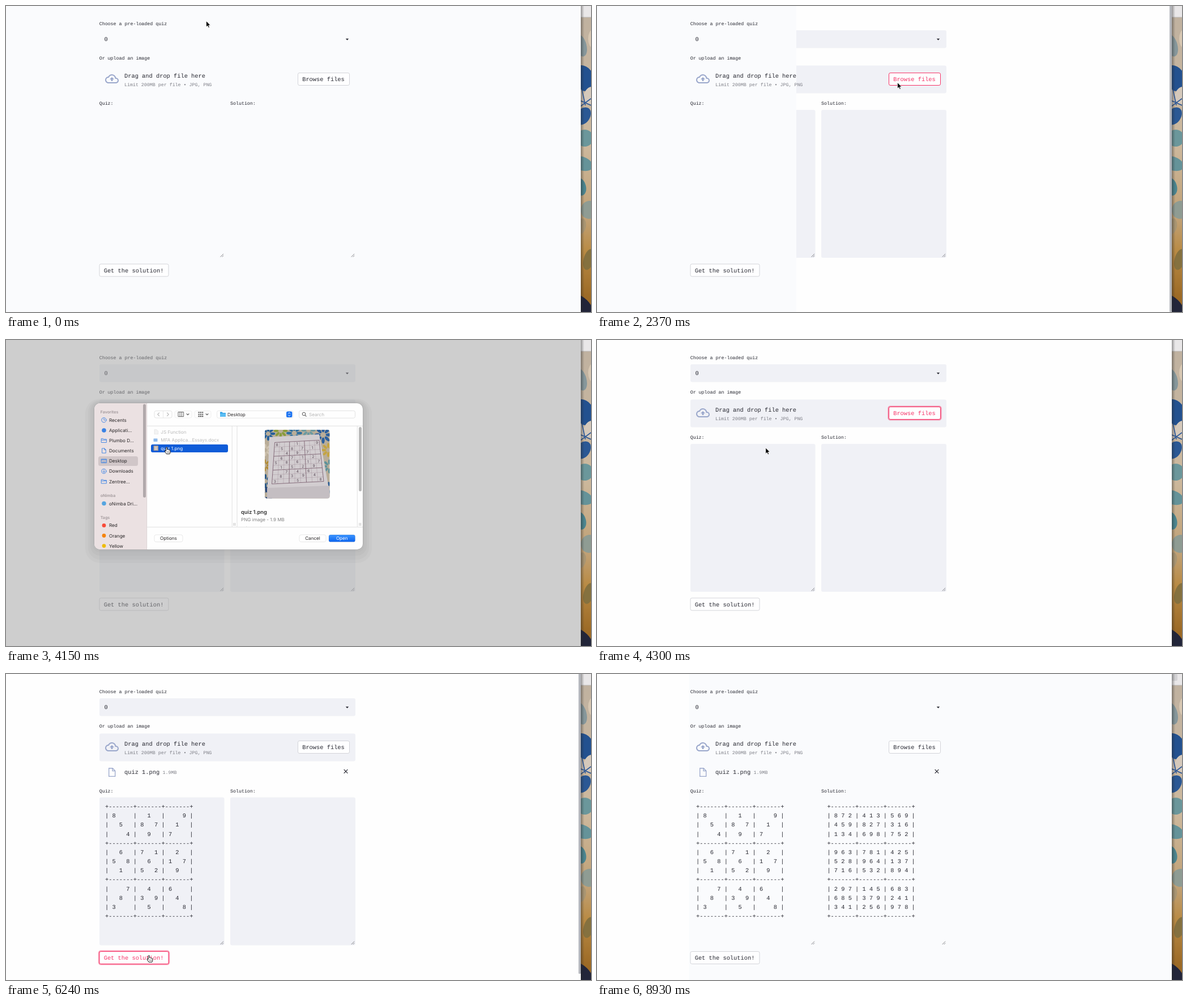
An HTML page for the animation above (9030 ms loop, 1033 by 542 pixels).

```html
<!DOCTYPE html>
<html lang="en">
<head>
<meta charset="utf-8">
<title>Quiz solver</title>
<style>
html, body { margin: 0; width: 100%; height: 100%; overflow: hidden; background: #fefefe; }
svg { display: block; width: 100vw; height: 100vh; }
text { white-space: pre; text-rendering: geometricPrecision; fill: #262730; }
.mono { font-family: "Liberation Mono", "Noto Sans Mono", monospace; }
.ui { font-family: Inter, Roboto, sans-serif; }
.box { fill: #fefeff; stroke: #d3d4d9; }
.ring { fill: none; stroke: #f63366; stroke-opacity: .5; stroke-width: 2.2; visibility: hidden; }
.hot .box { stroke: #f63366; }
.hot text { fill: #f63366; }
.focus .ring { visibility: visible; }
.icon { fill: none; stroke: #3a82e4; stroke-width: .9; stroke-linejoin: round; stroke-linecap: round; }
</style>
</head>
<body>
<script>
const LOOP = 9030;
const PANEL = "#f0f1f6", TINT = "#fafbfd";

// ---------- markup helpers ----------
const text = (cls, x, y, str, size, more = "") =>
  `<text class="${cls}" x="${x}" y="${y}" font-size="${size}" ${more}>${str}</text>`;
const mono = (x, y, str, size = 10.37, more) => text("mono", x, y, str, size, more);
const label = (x, y, str) => mono(x, y, str, 8.3);
const ui = (x, y, str, fill = "#2a2728", size = 8.15, more = "") =>
  text("ui", x, y, str, size, `style="fill:${fill}" ${more}`);
const rect = (x, y, w, h, r, fill, more = "") =>
  `<rect x="${x}" y="${y}" width="${w}" height="${h}" rx="${r}" fill="${fill}" ${more}/>`;
const path = (d, more = "") => `<path d="${d}" ${more}/>`;
const line = (d, color, w = 1) => path(d, `fill="none" stroke="${color}" stroke-width="${w}"`);
const dot = (x, y, r, fill) => `<circle cx="${x}" cy="${y}" r="${r}" fill="${fill}"/>`;
const oval = (x, y, rx, ry, fill, turn = 0) =>
  `<ellipse cx="${x}" cy="${y}" rx="${rx}" ry="${ry}" fill="${fill}" transform="rotate(${turn} ${x} ${y})"/>`;
const group = (id, body, more = "") => `<g id="${id}" ${more}>${body}</g>`;

const button = (id, x, y, w, str) => group(id,
  `<rect class="ring" x="${x - 1}" y="${y - 1}" width="${w + 2}" height="24" rx="3.5"/>` +
  `<rect class="box" x="${x}" y="${y}" width="${w}" height="22" rx="2.6"/>` +
  mono(x + 7.7, y + 14.6, str));

// ---------- quiz grids ----------
const QUIZ = "800010009050807010004090700060701020508060107010502090007040600080309040300050008";
const ANSWER = "872413569459827316134698752963781425528964137716532894297145683685379241341256978";

function gridLines(digits) {
  const rule = "+-------+-------+-------+", out = [];
  for (let r = 0; r < 9; r++) {
    if (r % 3 === 0) out.push(rule);
    const row = digits.slice(r * 9, r * 9 + 9).replace(/0/g, " ");
    out.push("| " + row.match(/.../g).map(s => [...s].join(" ")).join(" | ") + " |");
  }
  return [...out, rule];
}
const gridText = (id, x, digits) => group(id,
  gridLines(digits).map((s, i) => mono(x, (238 + i * 16.18).toFixed(2), s)).join(""));

// ---------- page ----------
const handle = x => line(`M${x - 6} 444.5l5.5-5.5M${x - 3} 444.5l2.5-2.5`, "#77787d", .9);
const cloud = "M19.35 10.04A7.49 7.49 0 0 0 12 4C9.11 4 6.6 5.64 5.35 8.04A6 6 0 0 0 0 14c0 3.31 2.69 6 6 6h13c2.76 0 5-2.24 5-5 0-2.64-2.05-4.78-4.65-4.96z" +
  "M19 18H6c-2.21 0-4-1.79-4-4 0-2.05 1.53-3.76 3.56-3.97l1.07-.11.5-.95A5.47 5.47 0 0 1 12 6c2.62 0 4.88 1.86 5.39 4.43l.3 1.5 1.53.11A2.98 2.98 0 0 1 22 15c0 1.65-1.35 3-3 3z" +
  "M8 13h2.55v3h2.9v-3H16l-4-4z";

const page =
  rect(0, 0, 1015, 542, 0, "#fefefe") +
  rect(165, 43, 452, 31.5, 3, PANEL) + rect(165, 105.5, 452, 49, 3, PANEL) +
  group("areas", rect(165, 184, 220.5, 262, 3, PANEL) + rect(396, 184, 221, 262, 3, PANEL)) +
  `<rect id="tint" height="542" fill="${TINT}"/>` +
  label(164.7, 33.7, "Choose a pre-loaded quiz") + mono(173.6, 62.4, "0") +
  path("M599.8 57.8h5.4l-2.7 3z", `fill="#262730"`) +
  label(164.7, 95.4, "Or upload an image") +
  path(cloud, `transform="translate(175 117)" fill="#9aa7cb"`) +
  mono(209, 127.3, "Drag and drop file here") +
  mono(209, 142.2, "Limit 200MB per file • JPG, PNG", 8.3, `style="fill:#7d7e86"`) +
  button("browse", 515.5, 118.5, 91, "Browse files") +
  group("file",
    line("M181.7 167h6.6l4.4 4.4v10h-11zM188 167.3v4.4h4.4", "#9aa7cb", 1.3) +
    mono(209, 176.6, "quiz 1.png") +
    mono(276.5, 176.5, "1.9MB", 8.3, `style="fill:#7d7e86"`) +
    line("M596.7 169.2l6.6 6.6m0-6.6l-6.6 6.6", "#262730", 1.2)) +
  group("lower",
    label(164.7, 175, "Quiz:") + label(396, 175, "Solution:") +
    handle(384.5) + handle(615.7) +
    button("solve", 165, 457, 122, "Get the solution!")) +
  gridText("quiz", 175, QUIZ) + gridText("answer", 406.4, ANSWER) +
  group("bar", rect(1011, -4, 4, 546, 1.5, "#b5b7bd"));

// ---------- patterned strip beside the window ----------
const strip = `<g clip-path="url(#stripClip)">` +
  rect(1015, 0, 18, 542, 0, "url(#cloth)") +
  oval(1015, 70, 10, 20, "#86979b", -15) + oval(1036, 58, 8, 16, "#d8c8b3") +
  oval(1020, 128, 18, 24, "#23518f", -25) + oval(1034, 158, 13, 16, "#d5c9bb", 25) +
  oval(1013, 160, 9, 15, "#cfc4b8", -20) + oval(1019, 195, 12, 17, "#2b5894", 35) +
  line("M1014 178l19-14M1017 148l6 28M1015 168l18 8", "#2a5799", 1.6) +
  oval(1022, 234, 15, 15, "#6b979b", 30) + oval(1017, 279, 20, 12, "#659399", 20) +
  oval(1014, 320, 10, 16, "#4c858f", -15) + oval(1030, 361, 15, 16, "#8f9c93", 20) +
  oval(1016, 390, 8, 14, "#a99572", 10) + oval(1029, 449, 9, 19, "#85713f", 15) +
  path("M1015 513Q1027 520 1033 530V542H1015Z", `fill="#22253a"`) +
  rect(1015, 0, 18, 20, 0, "#e9e7e8") + rect(1015, 19.5, 18, 1, 0, "#bcb8b6") +
  group("chip", rect(1015, 0, 10, 12, 2, "#d3d2d4")) +
  rect(1015, 0, 6, 542, 0, "url(#edge)") + `</g>`;

// ---------- preview photo ----------
function flower(x, y, r, color) {
  let s = "";
  for (let a = 0; a < 360; a += 45) {
    const k = a * Math.PI / 180;
    s += oval((x + Math.cos(k) * r).toFixed(1), (y + Math.sin(k) * r).toFixed(1), r * .55, r * .27, color, a);
  }
  return s;
}
// Bilinear mapping of the unit square onto the tilted sheet.
function onSheet(u, v) {
  const mix = (a, b, k) => a + (b - a) * k;
  return [mix(mix(474.5, 553, u), mix(469.5, 561, u), v), mix(mix(181.5, 177.5, u), mix(255, 250.5, u), v)]
    .map(n => n.toFixed(1));
}
function sheet() {
  let s = path("M465 172L553 167 572 274 461 281Z", `fill="#d2cdd0"`) +
          path("M461 262L570 258 572 274V281H461Z", `fill="#c4bec2"`);
  for (let i = 0; i <= 9; i++) {
    const k = i / 9, w = i % 3 ? .25 : .9;
    s += line(`M${onSheet(k, 0)}L${onSheet(k, 1)}M${onSheet(0, k)}L${onSheet(1, k)}`, "#7d6272", w);
  }
  [...QUIZ].forEach((d, i) => {
    if (d === "0") return;
    const [x, y] = onSheet((i % 9 + .5) / 9, (Math.floor(i / 9) + .5) / 9);
    s += ui(x, +y + 2.3, d, "#5b4b58", 6.6, `text-anchor="middle"`);
  });
  return s;
}
const photo = `<g clip-path="url(#photoClip)">` + rect(457, 159, 115, 122, 0, "#b9ad98") +
  [[463, 166, 8, "#27609a"], [485, 161, 8, "#8a9c3c"], [509, 165, 9, "#2f6f9f"], [534, 160, 8, "#6d9aa0"],
   [560, 168, 10, "#2c5f9d"], [569, 195, 8, "#c5a442"], [571, 224, 8, "#5f929a"], [458, 195, 7, "#cfc3b0"],
   [457, 222, 7, "#b28b33"], [458, 250, 8, "#2e5b88"], [460, 274, 9, "#29497c"], [570, 262, 7, "#2a5c93"]]
    .map(f => flower(...f)).join("") + sheet() + `</g>`;

// ---------- file dialog ----------
const folder = (x, y) => `M${x} ${y - 3.3}h3l1 1.2h4.8v5.6h-8.8zM${x} ${y - .8}h8.8`;
const glyph = d => path(d, `class="icon"`);
const ring = y => `<circle class="icon" cx="173" cy="${y}" r="4.1"/>`;
const pill = (x, w, str, fill, ink, id = "") =>
  `<g id="${id}">` + rect(x, 345, w, 12.6, 3.2, fill, `stroke="#000" stroke-opacity=".13" stroke-width=".7"`) +
  ui(x + w / 2, 354.2, str, ink, 8.15, `text-anchor="middle"`) + `</g>`;
const head = (y, str) => ui(166.7, y, str, "#a0979a", 7.1, `font-weight="600"`);
const item = (y, str) => ui(182, y, str);
const chevron = x => line(`M${x - 2.3} 130.4l2.3 2.3 2.3-2.3`, "#555", 1.1);
const grip = x => line(`M${x - 1} 324v5M${x + 1.5} 324v5`, "#b3b3b3", .8);

const sidebar = rect(156, 112, 92.5, 259, 0, "#ebe1e2") + rect(248.3, 112, .8, 259, 0, "#d6cccd") +
  rect(163, 206, 70, 17, 3.5, "#d0c6c8") + rect(242, 113.5, 5, 165.5, 2.5, "#b1a9ab") +
  head(129.8, "Favorites") + head(277.5, "oNimba") + head(316.6, "Tags") +
  ["Recents", "Applicati...", "Plumbo D...", "Documents", "Desktop", "Downloads", "Zentree..."]
    .map((s, i) => item((144.8 + i * 18.12).toFixed(1), s)).join("") +
  item(292.6, "oNimba Dri...") +
  ring(141.8) + glyph("M173 139.2v2.8h2") + dot(173, 160, 3.8, "#3a82e4") +
  glyph(folder(168.6, 178)) + glyph("M170 192h4l2.3 2.3v5.9h-6.3zM173.8 192v2.5h2.4") +
  glyph("M168.6 211h8.8v6.6h-8.8zM168.6 212.3h8.8M170 216h6") +
  ring(232.4) + glyph("M173 230v4.6m-1.8-1.8l1.8 1.8 1.8-1.8") + glyph(folder(168.6, 250.5)) +
  dot(173, 289.5, 3.8, "#56a5e0") +
  [["Red", "#f84a38"], ["Orange", "#f5840d"], ["Yellow", "#eebc0c"]]
    .map(([s, c], i) => dot(173, 328.4 + i * 18.1, 3.4, c) + item(331.4 + i * 18.1, s)).join("");

const toolbar =
  rect(262, 125.5, 31, 12.5, 3, "#fefefe", `stroke="#ddd" stroke-width=".8"`) +
  line("M277.5 126v12", "#e2e2e2", .8) +
  line("M270.8 128.6l-3 3.1 3 3.1M284.2 128.6l3 3.1-3 3.1", "#b4b4b4", 1.1) +
  [298, 333].map(x => rect(x, 125.5, x < 300 ? 30 : 29, 12.5, 3, "#fefefe", `stroke="#ececec" stroke-width=".8"`)).join("") +
  line("M304 127.6h9.6v8h-9.6zM307.2 127.6v8M310.4 127.6v8", "#555", .9) + chevron(321) +
  [0, 1, 2].map(i => line(`M339.3 ${128.3 + i * 3.4}h9`, "#666", 2.1)).join("") +
  line("M342 127v9.6M345.4 127v9.6", "#fefefe", .8) + chevron(355) +
  rect(372.5, 125.3, 134.5, 13, 3, "#fefefe", `stroke="#e3e3e3" stroke-width=".8"`) +
  path("M378 127.6h3.6l1.2 1.3h5.2v7h-10z", `fill="#2f9fe6"`) + rect(378, 130, 10, 5.9, .8, "#5bbdf3") +
  ui(391, 134.7, "Desktop") +
  rect(495, 126.4, 10.4, 10.6, 2.6, "#1d74f2") +
  line("M498.2 130.6l2-2 2 2M498.2 132.9l2 2 2-2", "#fff", 1) +
  rect(517.5, 125.3, 99, 13, 3, "#fefefe", `stroke="#dcdcdc" stroke-width=".8"`) +
  `<circle cx="526" cy="131" r="2.8" fill="none" stroke="#555"/>` + line("M528 133l2.4 2.6", "#555", 1.1) +
  ui(535, 134.9, "Search", "#b5b5b5");

const columns = line("M249 152.3H630M249 331.4H630M399.2 152V331M408 152V331", "#dedede", .9) + grip(403) +
  group("empty", line("M557.6 152V331M566.6 152V331", "#dedede", .9)) +
  group("picked", rect(256, 185, 136, 14, 3, "#0f5cd8") +
    line("M620.3 152V331", "#dedede", .9) + rect(623, 154, 5, 114, 2.5, "#b9b9b9") + grip(625) + photo +
    ui(415, 308, "quiz 1.png", "#333", 9.3, `font-weight="600"`) +
    ui(415, 321, "PNG image - 1.9 MB", "#808080") +
    `<g clip-path="url(#infoClip)">` + ui(415, 336.5, "Information", "#333", 8.15, `font-weight="600"`) + `</g>`) +
  path("M262 158.7h4l2.6 2.6v5.4h-6.6z", `fill="#f3f3f3" stroke="#ddd" stroke-width=".6"`) +
  ui(273.3, 166.2, "JS Function", "#bababa") +
  rect(260.5, 174.5, 7, 5.5, .6, "#8fb9ea") + ui(273.3, 180.4, "MFA Applica...Essays.docx", "#bababa") +
  rect(260.5, 187, 8.5, 9, .6, "#a99c92") + rect(262, 188.5, 5.5, 6.5, 0, "#cdc5c6") +
  `<text id="fileName" class="ui" x="273.3" y="194.8" font-size="8.15">quiz 1.png</text>`;

const dialog = group("dialog",
  rect(0, 0, 1015, 542, 0, "#a0a0a0", `opacity=".505"`) +
  [[16, 24], [11, 18], [7, 11], [3, 5]].map(([e, d]) =>
    rect(156 - e, 112 - e / 2, 474 + 2 * e, 259 + e / 2 + d, 10 + e, "#000", `opacity=".022"`)).join("") +
  rect(155.5, 111.5, 475, 260, 10.5, "#a2a2a2") +
  `<g clip-path="url(#dialogClip)">` + rect(156, 112, 474, 259, 0, "#fefefe") + sidebar + toolbar + columns +
  pill(262, 50, "Options", "#fff", "#2a2728") + pill(518, 47, "Cancel", "#fff", "#2a2728") +
  pill(570, 46.5, "Open", "#fdfdfd", "#c3c3c3", "openOff") + pill(570, 46.5, "Open", "url(#blue)", "#fff", "openOn") + `</g>`);

// ---------- pointers ----------
const pointer = group("cursor",
  group("arrow", path("M0 0V10.6L2.5 8.4 4.1 12 5.9 11.2 4.3 7.7H7.5Z", `fill="#000" stroke="#fff" stroke-width=".8"`)) +
  group("hand", path("M-1 1A1.1 1.1 0 0 1 1.2 1V4.2Q2.3 3.5 3 4.6Q4.2 4 4.8 5.2Q6.6 4.7 6.6 6.6V8.5Q6.4 10 5.6 11.8H-.2Q-1.5 9.5-3.2 7.2Q-3.6 5.8-2.2 6L-1 7Z",
    `fill="#fff" stroke="#111" stroke-width="1" stroke-linejoin="round"`) +
    line("M1.2 7.2v2.6M2.9 7.2v2.6M4.6 7.2v2.6", "#333", .6)));

const stop = (at, color, alpha = 1) => `<stop offset="${at}" stop-color="${color}" stop-opacity="${alpha}"/>`;
const clip = (id, x, y, w, h, r) => `<clipPath id="${id}">${rect(x, y, w, h, r, "#000")}</clipPath>`;
const defs = `<defs>` +
  `<linearGradient id="cloth" x2="0" y2="1">${stop(0, "#bfb1a0")}${stop(.45, "#cdb99e")}${stop(.7, "#c0a074")}${stop(.8, "#b98b45")}${stop(.95, "#9c6a26")}</linearGradient>` +
  `<linearGradient id="edge">${stop(0, "#222", .42)}${stop(1, "#222", 0)}</linearGradient>` +
  `<linearGradient id="blue" x2="0" y2="1">${stop(0, "#3d95ff")}${stop(1, "#0a63ee")}</linearGradient>` +
  clip("stripClip", 1015, 0, 18, 542, 0) + clip("dialogClip", 156, 112, 474, 259, 10) +
  clip("photoClip", 457, 159, 114.5, 121.5, 4) + clip("infoClip", 409, 324, 200, 7, 0) + `</defs>`;

document.body.insertAdjacentHTML("beforeend",
  `<svg xmlns="http://www.w3.org/2000/svg" viewBox="0 0 1033 542">${defs}${strip}${page}${dialog}${pointer}</svg>`);

// ---------- timeline ----------
// Each move: first step, last step, number of steps, bend point, end point.
const MOVES = [
  [290, 1170, 7, [420, 30], [470, 78]],
  [1470, 2370, 7, [490, 120], [530.5, 135.5]],
  [2510, 2510, 1, [524, 139], [517.5, 143]],
  [2660, 3550, 7, [140, 225], [283.5, 190]],
  [4300, 4450, 2, [295, 190], [317.5, 193.5]],
  [4600, 4600, 1, [360, 200], [399.5, 212.5]],
  [4900, 5800, 7, [370, 430], [252.3, 498.5]],
  [7140, 8180, 8, [620, 420], [860, -20]]
];

function cursorAt(t) {
  let pos = [353.5, 26.5];
  for (const [start, end, n, bend, to] of MOVES) {
    if (t < start) break;
    const gap = n > 1 ? (end - start) / (n - 1) : 1;
    const k = Math.min(n, Math.floor((t - start) / gap + 1e-6) + 1) / n;
    const u = n > 2 ? Math.sin(k * Math.PI / 2) ** 1.4 : k;
    pos = pos.map((p, i) => p * (1 - u) ** 2 + 2 * u * (1 - u) * bend[i] + to[i] * u * u);
  }
  return pos;
}

const $ = id => document.getElementById(id);
const show = (id, on) => $(id).style.display = on ? "" : "none";
const within = (t, a, b) => t >= a && t < b;
const over = ([x, y], l, top, r, b) => x >= l && x <= r && y >= top && y <= b;
function mark(id, hover, focus) {
  $(id).setAttribute("class", (hover || focus ? "hot " : "") + (focus ? "focus" : ""));
}

function draw(t) {
  const pos = cursorAt(t);
  const open = within(t, 2510, 4300), picked = within(t, 4000, 4300);
  const loaded = t >= 4600, last = t >= 8930;
  const onSolve = loaded && over(pos, 165, 491, 287, 514);

  const [left, right] = t < 290 ? [0, 1015] : t < 2510 ? [0, 352] : last ? [162.5, 1015] : [0, 0];
  $("tint").setAttribute("x", left);
  $("tint").setAttribute("width", right - left);

  const shift = `translate(0 ${loaded ? 34.5 : 0})`;
  $("areas").setAttribute("transform", shift);
  $("lower").setAttribute("transform", shift);
  show("file", loaded);
  show("quiz", loaded);
  show("answer", t >= 6840);
  show("bar", within(t, 290, 2510) || within(t, 4600, 7140));
  $("bar").setAttribute("transform", `translate(0 ${loaded ? -11 : 0})`);
  show("chip", last);

  mark("browse", !open && over(pos, 515, 118, 607, 141), within(t, 4300, 5950));
  mark("solve", onSolve && !last, within(t, 5950, 8930));

  show("dialog", open);
  show("picked", picked);
  show("empty", !picked);
  show("openOn", picked);
  show("openOff", !picked);
  $("fileName").style.fill = picked ? "#fff" : "#222";

  show("cursor", !last);
  show("hand", picked || onSolve);
  show("arrow", !(picked || onSolve));
  $("cursor").setAttribute("transform", `translate(${pos[0].toFixed(1)} ${pos[1].toFixed(1)})`);
}

const began = performance.now();
function tick() {
  draw((performance.now() - began) % LOOP);
  requestAnimationFrame(tick);
}
tick();
</script>
</body>
</html>
```
